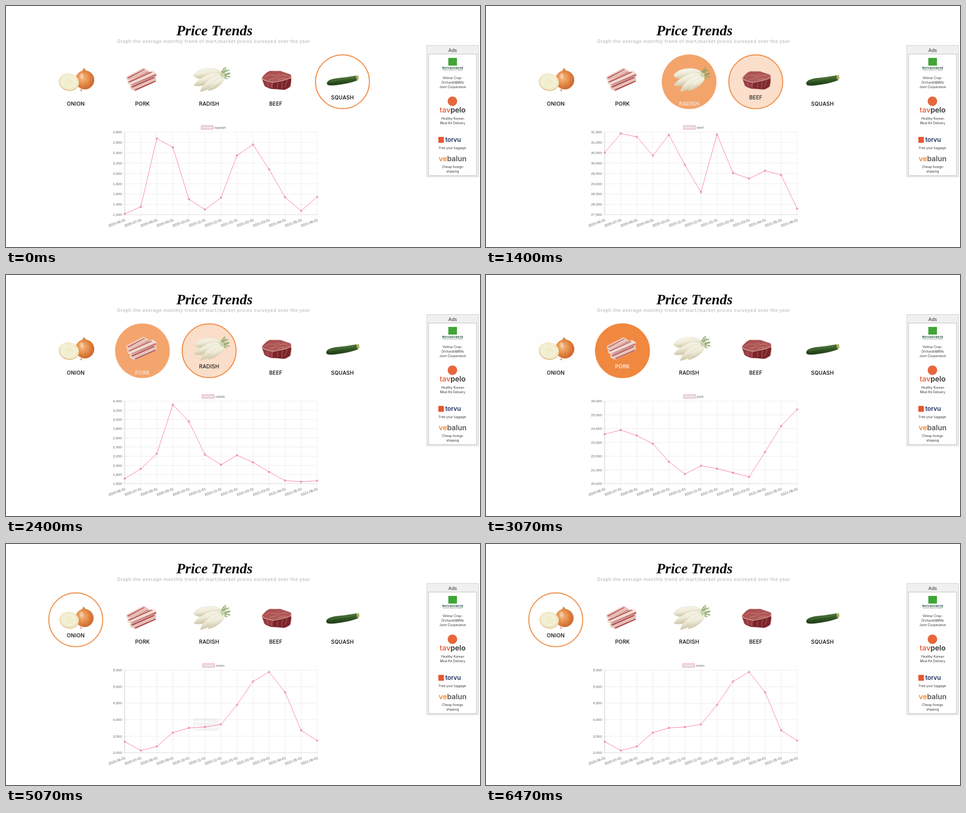
These frames come from a looping animation (1048x534 px, 6670 ms). An HTML page:

```html
<!DOCTYPE html>
<html lang="en">
<head>
<meta charset="utf-8">
<title>Price Trends</title>
<style>
  html, body { margin: 0; width: 100%; height: 100%; overflow: hidden; background: #fff; }
  svg { display: block; width: 100vw; height: 100vh; font-family: Inter, "Open Sans", sans-serif; }
  .mid { text-anchor: middle; }
  .title { font: italic bold 32px "Liberation Serif", serif; fill: #0c0c0c; }
  .subtitle { font-size: 10px; font-weight: 600; letter-spacing: .62px; fill: #c3c3c3; }
  .label { font-size: 11.5px; font-weight: 500; letter-spacing: .25px; text-anchor: middle; fill: #000; }
  .ad { font-size: 7px; fill: #333; text-anchor: middle; }
  .brand { font-weight: 600; text-anchor: middle; }
  .korean { font: bold 4.6px "Noto Sans CJK KR", "Noto Sans CJK", sans-serif; fill: #16443b; }
  .chart { font: 7.8px "Liberation Sans", sans-serif; fill: #666; }
  .end { text-anchor: end; }
  .grid { fill: none; stroke: #000; stroke-opacity: .1; stroke-width: .8; }
  .line { fill: none; stroke: #ff6384; stroke-width: .9; stroke-linejoin: round; }
  .dot, .key { fill: rgba(0, 0, 0, .1); stroke: #f0708c; stroke-width: .8; }
  .tip { fill: #fff; opacity: 0; }
  .halo { fill: #ef7d2d; opacity: 0; }
  .ring { fill: none; stroke: #ef7d2d; stroke-width: 2; opacity: 0; }
</style>
</head>
<body>
<svg id="stage" viewBox="0 0 1048 534" preserveAspectRatio="none">
  <defs>
    <radialGradient id="skin" cx=".38" cy=".4" r=".65">
      <stop offset="0" stop-color="#f6c08a"/><stop offset=".5" stop-color="#e98f4a"/><stop offset="1" stop-color="#c9642a"/>
    </radialGradient>
    <radialGradient id="flesh">
      <stop offset="0" stop-color="#eeeac0"/><stop offset=".6" stop-color="#f8f5df"/><stop offset="1" stop-color="#f0e9c8"/>
    </radialGradient>
    <linearGradient id="root" x1="0" y1="0" x2=".4" y2="1">
      <stop offset="0" stop-color="#fbfaf1"/><stop offset=".55" stop-color="#f0ecd9"/><stop offset="1" stop-color="#c4bc9a"/>
    </linearGradient>
    <linearGradient id="peel" x1="0" y1="0" x2=".15" y2="1">
      <stop offset="0" stop-color="#5a7c3c"/><stop offset=".45" stop-color="#38602a"/><stop offset="1" stop-color="#1d3814"/>
    </linearGradient>
    <linearGradient id="meat" x1="0" y1="0" x2="1" y2="1">
      <stop offset="0" stop-color="#a84a4c"/><stop offset="1" stop-color="#b5605c"/>
    </linearGradient>

    <g id="onion">
      <path d="M13-24Q18-27 16-30L20-29Q21-25 27-23Z" fill="#c98a4e"/>
      <ellipse cx="20" cy="-4" rx="21" ry="21" fill="url(#skin)"/>
      <path d="M17-24Q4-8 11 13M20-24Q20-6 20 15M23-24Q38-8 30 12" fill="none" stroke="#b8602a" stroke-opacity=".3" stroke-width=".8"/>
      <ellipse cx="13" cy="-13" rx="4" ry="6" fill="#fff" opacity=".35"/>
      <g transform="rotate(12 -15 1)">
        <ellipse cx="-15" cy="1" rx="22.500" ry="19" fill="#dfae6c"/>
        <ellipse cx="-15" cy=".3" rx="21.800" ry="18.200" fill="url(#flesh)"/>
        <path d="M-32 1Q-15-27 3 2Q-15 27-32 1M-27 2Q-15-17-4 2Q-15 17-27 2" fill="none" stroke="#cfd09a" stroke-opacity=".5" stroke-width=".8"/>
      </g>
      <path d="M9 17L14 18L13 22Z" fill="#b98956"/>
    </g>

    <g id="pork">
      <path d="M-36-11L2-31L13-25L15-21L-27-2L-35-4Z" fill="#efd3c8"/>
      <path d="M-34-9L3-28L6-27L-31-7ZM-27-4L13-23L14-21L-26-2Z" fill="#bd6462"/>
      <path d="M-34-1L22-25L31-19L31-12L-23 12L-33 4Z" fill="#f2ddd2"/>
      <path d="M-32 0L18-22L22-21L-29 2ZM-24 7L30-17V-13L-23 11Z" fill="#b85a5b"/>
      <path d="M-28 10L27-13L31-8L30 0L-16 21L-27 16Z" fill="#eed3c9"/>
      <path d="M-26 11L25-11L28-9L-22 13ZM-17 17L29-3V0L-16 20Z" fill="#b05054"/>
      <path d="M-27 7L28-17M-22 16L28-6M-30-5L10-25" fill="none" stroke="#d79c96" stroke-width="1.200"/>
    </g>

    <g id="radish">
      <path d="M25-16Q29-26 37-32M28-15Q35-24 44-26M29-13Q38-19 47-19M29-11Q38-14 47-10M28-10Q36-10 40-6" fill="none" stroke="#86a565" stroke-width="2.600" stroke-dasharray="5 .7"/>
      <path d="M24-15L38-28M26-12L45-17" fill="none" stroke="#587d42" stroke-width="1.200"/>
      <g fill="url(#root)" stroke="#cfc8aa" stroke-width=".5">
        <path d="M30-19Q18-33-8-29Q-26-27-35-14Q-30-6-14-7Q14-5 30-19Z"/>
        <path d="M31-15Q15-25-6-15Q-26-5-34 8Q-23 12-7 6Q20-3 31-15Z"/>
        <path d="M33-13Q18-19 2-7Q-15 6-20 22Q-8 21 8 10Q28-2 33-13Z"/>
        <path d="M34-11Q21-12 10 0Q3 8-3 20Q10 19 22 9Q35-1 34-11Z"/>
      </g>
      <path d="M24-18L32-20L35-12L28-9Z" fill="#c9d4a6"/>
    </g>

    <g id="beef">
      <path d="M-31-8Q-23-20-13-24Q2-23 9-24Q24-19 33-16Q36-6 32 11Q24 17 18 18Q0 16-10 16Q-20 13-25 9Z" fill="#7c2429"/>
      <path d="M-31-8Q-23-20-13-24Q2-23 9-24Q24-19 33-16L34-9Q22-2 12-2L-6 0Q-20-1-27-2Z" fill="url(#meat)"/>
      <path d="M-28 0L-6 1L-8 15Q-18 13-24 8Z" fill="#983a41"/>
      <g fill="none" stroke="#e3bdb2" stroke-linecap="round">
        <path d="M-30-8Q-26-1-6 1Q10 0 34-9" stroke-width="1.800" stroke-opacity=".8"/>
        <path d="M-23-9Q-18-17-9-15Q0-12 8-18M-14-5Q-2-7 7-12T25-14M4-4Q11-8 19-8M-19 3Q-20 7-17 10M-7 2Q-10 9-8 14M5 3Q2 8 4 13M15 0Q12 8 14 15M25-3Q23 5 20 11" stroke-opacity=".55"/>
      </g>
    </g>

    <g id="squash">
      <path d="M-35 1Q-33-5-14-8Q8-10 30-14L35-13Q38-8 34-3Q16 4-8 7Q-24 10-33 8Q-38 5-35 1Z" fill="url(#peel)"/>
      <path d="M-30 0Q-6-6 29-10" fill="none" stroke="#7a975a" stroke-width="1.200" stroke-opacity=".5"/>
      <path d="M31-14L36-15L38-8L35-4L32-6Z" fill="#b3b565"/>
    </g>
  </defs>

  <text class="title mid" x="461" y="65">Price Trends</text>
  <text class="subtitle mid" x="459" y="82">Graph the average monthly trend of mart/market prices surveyed over the year</text>

  <g id="ads">
    <rect x="930.500" y="87.500" width="114" height="291" fill="#f0f0f0" stroke="#ccc"/>
    <rect x="934.500" y="106.500" width="106" height="269" fill="#fff" stroke="#bbb"/>
    <text class="mid" x="987.500" y="102" font-size="10.500" fill="#333">Ads</text>

    <rect x="978" y="115" width="19" height="17" fill="#3fa535"/>
    <text class="korean mid" x="987.500" y="139">벨마르농원과수협동조합</text>
    <text class="mid" x="987.500" y="142.500" font-size="2.300" fill="#555">Velmar Crop Orchards Joint Cooperative</text>
    <text class="ad" x="987.500" y="161.700">Velmar Crop-</text>
    <text class="ad" x="987.500" y="171.700">Orchards&amp;Mills</text>
    <text class="ad" x="987.500" y="181.700">Joint Cooperative</text>

    <circle cx="987" cy="211" r="10.500" fill="#e8663c"/>
    <text class="brand" x="987.500" y="236" font-size="16" fill="#333"><tspan fill="#e8663c">tav</tspan>pelo</text>
    <text class="ad" x="987.500" y="252.200">Healthy Korean</text>
    <text class="ad" x="987.500" y="262.200">Meal Kit Delivery</text>

    <rect x="956" y="290" width="12" height="13" fill="#e9552f"/>
    <text class="brand" x="988.500" y="300.500" font-size="13.500" fill="#1c2f5c">torvu</text>
    <text class="ad" x="987" y="316.500">Free your luggage</text>

    <text class="brand" x="987.500" y="344" font-size="16" fill="#5a5a5a"><tspan fill="#ef8a3a">ve</tspan>balun</text>
    <text class="ad" x="987.500" y="359">Cheap foreign</text>
    <text class="ad" x="987.500" y="369">shipping</text>
  </g>
</svg>

<script>
const LOOP = 6670;
const FADE = 300;
const SETTLE = 262;
const REFLOW = 40;
const OUT_QUART = 'cubic-bezier(.25, 1, .5, 1)';
const PLOT = { left: 262.5, right: 688, top: 279.5, bottom: 462.5 };
const stage = document.getElementById('stage');

// picked / dropped: clicks that select or replace an item; hover: pointer enters / leaves
const items = [
  { name: 'onion', x: 154.2, picked: 3525, dropped: LOOP, hover: [3066, 3690],
    min: 3000, max: 5500, step: 500,
    data: [3335, 3068, 3191, 3608, 3751, 3779, 3858, 4448, 5158, 5445, 4830, 3676, 3369] },
  { name: 'pork', x: 301.7, picked: 2665, dropped: 3525, hover: [2268, 3066],
    min: 20000, max: 26000, step: 1000,
    data: [23600, 23900, 23500, 22900, 21600, 20700, 21300, 21100, 20800, 20500, 22300, 24200, 25400] },
  { name: 'radish', x: 449.1, picked: 1865, dropped: 2665, hover: [1266, 2268],
    min: 1600, max: 3400, step: 200,
    data: [1713, 1925, 2254, 3321, 2957, 2235, 2013, 2220, 2067, 1856, 1669, 1644, 1664] },
  { name: 'beef', x: 596.5, picked: 865, dropped: 1865, hover: [466, 1266],
    min: 27500, max: 31500, step: 500,
    data: [30505, 31435, 31270, 30360, 31370, 29915, 28590, 31390, 29520, 29250, 29630, 29425, 27785] },
  { name: 'squash', x: 743.9, picked: 0, dropped: 865,
    min: 1200, max: 2800, step: 200,
    data: [1217, 1353, 2678, 2507, 1502, 1300, 1528, 2350, 2560, 2079, 1537, 1274, 1545] },
];

function add(parent, tag, attrs = {}, text = '') {
  const el = document.createElementNS('http://www.w3.org/2000/svg', tag);
  for (const key in attrs) el.setAttribute(key, attrs[key]);
  el.textContent = text;
  parent.append(el);
  return el;
}

// Keys are [ms, properties, easing]; without an easing the value holds until the next key.
function track(el, ...keys) {
  const last = keys[keys.length - 1];
  if (last[0] < LOOP) keys.push([LOOP, last[1]]);
  el.animate(
    keys.map(([ms, props, easing = 'steps(1, end)']) => ({ offset: ms / LOOP, easing, ...props })),
    { duration: LOOP, iterations: Infinity });
}

function toggle(el, from, to, off, on) {
  const keys = from > 0 ? [[0, off], [from, on]] : [[0, on]];
  if (to < LOOP) keys.push([to, off]);
  track(el, ...keys);
}

function fade(el, [enter, leave], off, on, easing = 'ease', span = FADE) {
  track(el, [0, off], [enter, off, easing], [Math.min(enter + span, leave), on],
    [leave, on, easing], [leave + span, off]);
}

const HIDDEN = { opacity: 0 };
const SHOWN = { opacity: 1 };

function drawItem({ name, x, picked, dropped, hover }) {
  const group = add(stage, 'g', { transform: `translate(${x} 167.8)` });
  const body = add(group, 'g');
  const halo = add(body, 'circle', { r: 60.5, class: 'halo' });
  const ring = add(body, 'circle', { r: 59.6, class: 'ring' });
  const art = add(add(body, 'g'), 'use', { href: '#' + name });
  const label = add(body, 'text', { y: 53.4, class: 'label' }, name.toUpperCase());

  const start = picked && picked + REFLOW;
  toggle(ring, start, dropped, HIDDEN, SHOWN);
  toggle(art, start, dropped, { transform: 'scale(1)' }, { transform: 'scale(.96)' });
  toggle(label, start, Math.min(dropped + REFLOW, LOOP),
    { transform: 'translate(0px, 0px)' }, { transform: 'translate(0px, -14px)' });

  if (!hover) return;
  const thick = picked + SETTLE;
  track(ring, [0, { strokeWidth: '1px' }], [thick, { strokeWidth: '2px' }]);
  track(ring, [0, { stroke: '#333' }], [picked, { stroke: '#333' }, 'ease'], [picked + FADE, { stroke: '#ef7d2d' }]);
  fade(halo, hover, HIDDEN, SHOWN);
  fade(body, hover, SHOWN, { opacity: .92 });
  fade(label, hover, { fill: '#000' }, { fill: '#fff' }, 'ease', 200);
}

const pointX = i => PLOT.left + i * (PLOT.right - PLOT.left) / 12;
const pointY = ({ min, max }, v) => PLOT.bottom - (v - min) / (max - min) * (PLOT.bottom - PLOT.top);
const month = i => `${i < 7 ? 2020 : 2021}-${String((i + 5) % 12 + 1).padStart(2, '0')}-01`;

function drawTimeAxis() {
  const axis = add(stage, 'g', { class: 'chart' });
  for (let i = 0; i < 13; i++) {
    const x = pointX(i);
    add(axis, 'path', { class: 'grid', d: `M${x} ${PLOT.top}V${PLOT.bottom + 6.5}` });
    add(axis, 'text', { class: 'end', transform: `translate(${x + 1.5} 473.5) rotate(-20)`, y: 2.7 }, month(i));
  }
  const { left, right, top, bottom } = PLOT;
  add(axis, 'path', { class: 'grid', d: `M${left} ${top}V${bottom}H${right}` });
  add(axis, 'path', { class: 'grid', d: `M${left} ${top}V${bottom}` });
}

function drawChart(item) {
  const { name, min, max, step, data, picked, dropped } = item;
  const chart = add(stage, 'g', { class: 'chart' });
  for (let v = min; v <= max; v += step) {
    const y = pointY(item, v);
    add(chart, 'path', { class: 'grid', d: `M${PLOT.left - 6.5} ${y}H${PLOT.right}` });
    add(chart, 'text', { class: 'end', x: 256, y: y + 2.7 }, v.toLocaleString('en-US'));
  }
  const points = data.map((v, i) => [pointX(i), pointY(item, v)]);
  add(chart, 'polyline', { class: 'line', points: points.join(' ') });
  for (const [cx, cy] of points) add(chart, 'circle', { class: 'dot', cx, cy, r: 2 });

  const caption = add(chart, 'text', { y: 271.6 }, name);
  const left = 459 - (29 + caption.getComputedTextLength()) / 2;
  caption.setAttribute('x', left + 29);
  add(chart, 'rect', { class: 'key', x: left, y: 265.2, width: 26, height: 7.8 });
  toggle(chart, picked, dropped, HIDDEN, SHOWN);
}

function drawTooltip(item, index, value, [enter, leave], moveFrom) {
  const x = pointX(index);
  const y = pointY(item, item.data[index]);
  const dot = add(stage, 'circle', { class: 'dot', cx: x, cy: y, r: 2.7 });
  toggle(dot, enter + REFLOW, leave, HIDDEN, SHOWN);

  const place = i => `translate(${pointX(i) - 61.7}px, ${pointY(item, item.data[i]) - 14.2}px)`;
  const tip = add(stage, 'g', { class: 'chart tip' });
  add(tip, 'path', {
    d: 'M4 0H53.5Q57.500 0 57.500 4V11L60.800 14.200L57.500 17.400V24.400Q57.500 28.400 53.500 28.400H4Q0 28.400 0 24.400V4Q0 0 4 0Z',
    fill: '#000', 'fill-opacity': .8 });
  add(tip, 'text', { x: 4, y: 10.6, 'font-weight': 'bold' }, month(index));
  add(tip, 'rect', { x: 4, y: 16.2, width: 7.6, height: 7.6, fill: '#e5e5e5', stroke: '#ff6384', 'stroke-width': .7 });
  add(tip, 'text', { x: 13.2, y: 22.7 }, `${item.name}: ${value}`);

  fade(tip, [enter, leave], HIDDEN, SHOWN, OUT_QUART, 400);
  const from = { transform: place(moveFrom) };
  track(tip, [0, from], [enter, from, OUT_QUART], [enter + 400, { transform: place(index) }]);
}

items.forEach(drawItem);
drawTimeAxis();
items.forEach(drawChart);
drawTooltip(items[0], 6, 3860, [5066, 5430], 6);
drawTooltip(items[0], 7, 4450, [5902, 6180], 6);
</script>
</body>
</html>
```
